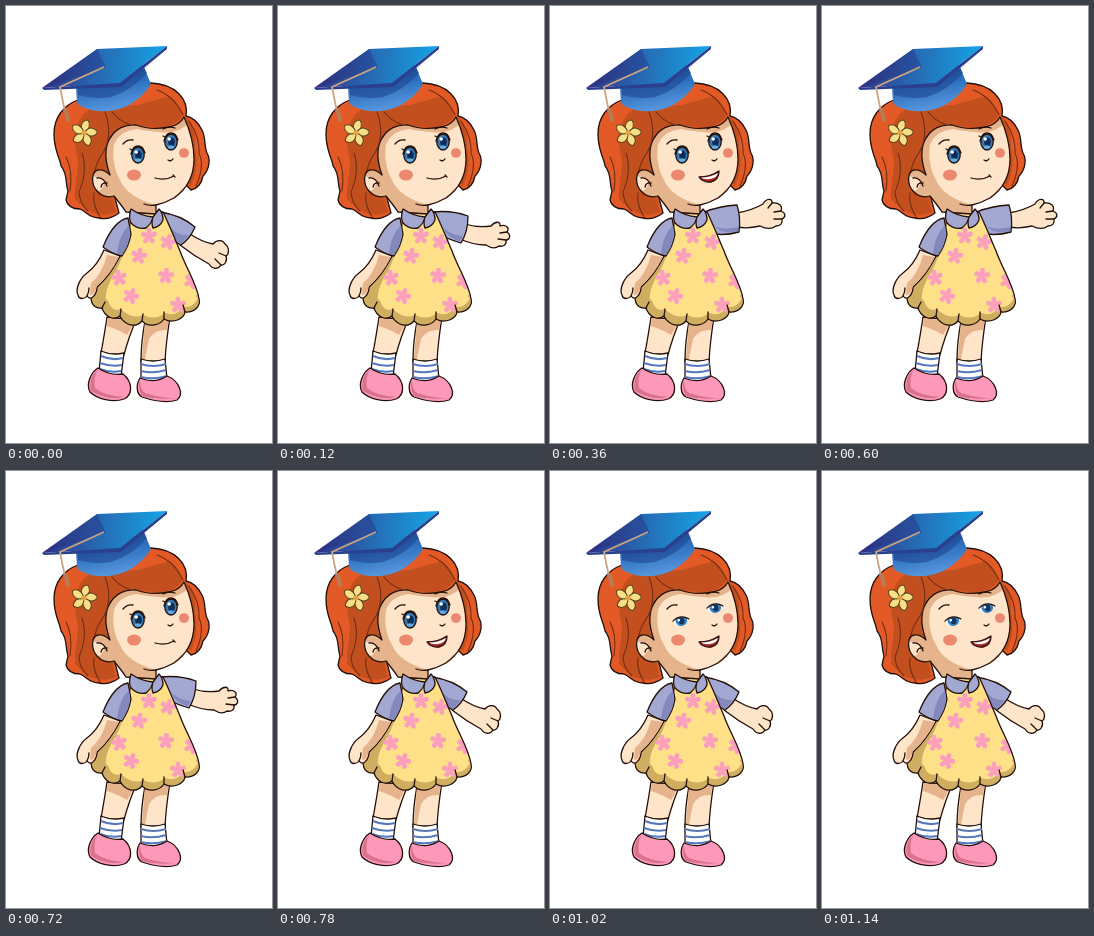
Write an HTML page that moves like this. It is 266x437 px and loops after 1200 ms.

```html
<!DOCTYPE html>
<html lang="en">
<head>
<meta charset="utf-8">
<title>Waving girl</title>
<style>
html, body { margin: 0; width: 100%; height: 100%; overflow: hidden; background: #fff; }
svg { display: block; width: 266px; height: 437px; }
.ink { stroke: #24100a; stroke-width: 1.3; stroke-linejoin: round; stroke-linecap: round; }
.line { fill: none; }
.skin { fill: #fee4c8; }
.shade { fill: #e5b48c; }
.sleeve { fill: #a3a8d3; }
.fold { fill: #8289bb; }
.strand { fill: none; stroke: #722d12; stroke-width: 1.1; stroke-linecap: round; }
.pose { opacity: 0; }
</style>
</head>
<body>
<svg viewBox="0 0 266 437">
  <defs>
    <linearGradient id="board" x2="1"><stop stop-color="#303184"/><stop offset=".4" stop-color="#2864ae"/><stop offset="1" stop-color="#14a5e6"/></linearGradient>
    <linearGradient id="cap" x2=".3" y2="1"><stop stop-color="#244f9d"/><stop offset=".55" stop-color="#2d70bd"/><stop offset="1" stop-color="#5595dc"/></linearGradient>
    <path id="gown" d="M125 207 C124 228 118 247 106 262 C97 275 88 283 85 291 C85 300 91 303 96 302 C99 311 108 315 114 310 C119 320 130 322 136 315 C143 322 154 319 158 313 C167 318 178 313 179 306 C188 307 195 300 193 293 C191 278 180 262 174 245 C168 231 163 218 157 206Z"/>
    <clipPath id="inGown"><use href="#gown"/></clipPath>
    <path id="headSkin" d="M108 190 C102 192 95 190 91 185 C84 177 86 165 92 164 C97 163 101 166 104 169 C100 158 98 144 103 134 C109 122 120 118 130 119 C143 124 153 123 163 121 Q174 119 178 111 C183 122 188 139 188 153 C188 170 181 183 168 192 Q159 197 150 199 L150 208 L120 206 Q116 200 108 190Z"/>
    <clipPath id="inHead"><use href="#headSkin"/></clipPath>
    <g id="bloom"></g>
  </defs>

  <!-- legs -->
  <g class="ink">
    <path class="skin" d="M101 311 Q98 331 95 347 L118 349 Q122 333 130 314Z"/>
    <path class="skin" d="M139 315 Q135 336 135 356 L159 356 Q160 336 164 311Z"/>
  </g>
  <path class="shade" d="M102 312 L128 315 Q124 325 121 329 Q113 324 101 320ZM139 316 L163 313 L161 324 Q149 323 143 333 L139 353 L136 353Z"/>
  <g class="ink" fill="#fff">
    <path d="M95 345 Q106 350 118 347 L115 371 Q103 371 93 366Z"/>
    <path d="M135 353 Q147 357 159 353 L161 373 Q147 379 135 374Z"/>
  </g>
  <g fill="none" stroke="#5479bd" stroke-width="2">
    <path d="M95 350 Q106 355 117 352M94 357 Q105 361 116 359M94 363 Q104 367 115 365"/>
    <path d="M135 358 Q147 362 160 358M135 365 Q147 368 160 364M135 371 Q147 374 161 370"/>
  </g>
  <g class="ink" fill="#fe98ba">
    <path d="M92 362 C84 367 80 379 84 386 C91 393 107 397 118 393 C127 389 127 376 117 368 Q104 370 92 362Z"/>
    <path d="M134 372 C130 378 130 388 136 391 C148 395 162 397 171 394 C178 389 174 375 161 370 Q149 378 134 372Z"/>
  </g>
  <path fill="#d9728f" d="M91 364 Q87 375 89 382 Q99 390 118 391 Q102 395 85 385 Q82 373 91 364ZM134 374 Q134 384 139 387 Q153 392 170 392 Q151 394 136 390 Q131 382 134 374Z"/>

  <!-- right arm -->
  <g id="armDown" class="ink pose">
    <path class="skin" d="M184 228 Q196 236 207 238 C211 233 217 234 219 238 C224 242 223 248 220 250 C222 255 218 260 215 259 C212 264 206 263 203 258 Q188 250 174 239Z"/>
    <path class="line" d="M220 250 L213 247M215 259 L209 253"/>
    <path class="sleeve" d="M154 206 Q175 209 189 221 Q184 233 175 239 Q165 234 157 225Z"/>
    <path class="fold" stroke="none" d="M165 222 Q172 230 183 229 L175 238 Q167 234 165 222Z"/>
  </g>
  <g id="armMid" class="ink pose">
    <path class="skin" d="M187 218 Q200 222 213 220 C217 215 223 215 222 220 C228 218 232 222 229 226 C234 230 231 234 228 234 C229 239 225 241 221 240 C216 244 211 241 208 239 Q195 239 182 233Z"/>
    <path class="line" d="M229 226 L222 227M228 234 L220 233"/>
    <path class="sleeve" d="M154 206 Q174 204 190 210 Q190 226 183 237 Q169 233 157 226Z"/>
    <path class="fold" stroke="none" d="M166 222 Q173 229 185 230 L182 235 Q169 232 166 222Z"/>
  </g>
  <g id="armUp" class="pose">
    <g id="raised" class="ink">
      <path class="skin" d="M187 207 Q203 204 213 198 C216 192 223 192 222 197 C229 196 233 200 231 205 C236 207 236 211 232 213 C233 218 230 220 226 220 C221 224 214 222 210 220 Q198 223 186 221Z"/>
      <path class="line" d="M222 197 L218 202M231 205 L224 206M232 213 L224 213"/>
      <path class="sleeve" d="M154 206 Q170 200 187 199 Q191 212 189 226 Q171 231 157 226Z"/>
      <path class="fold" stroke="none" d="M165 220 Q174 225 188 221 L188 225 Q171 229 165 220Z"/>
    </g>
  </g>
  <g id="armHigh" class="pose"><use href="#raised" transform="rotate(7 160 215)"/></g>

  <!-- dress -->
  <use href="#gown" fill="#fde087"/>
  <g clip-path="url(#inGown)">
    <path fill="#cfae62" d="M124 212 Q124 236 110 265 Q98 284 100 293 Q106 300 115 299 Q127 309 138 303 Q149 311 160 303 Q170 306 178 296 Q187 299 191 288 L197 325 L80 325 L84 286Z"/>
    <path fill="#fde087" d="M101 290 Q104 307 115 303 Q126 314 137 309 Q149 315 159 307 Q170 311 178 301 Q187 302 192 292 L160 265 L116 270Z"/>
    <g id="print" fill="#fa9fbd"></g>
  </g>
  <use href="#gown" class="ink line"/>
  <path class="ink line" stroke-width="1" d="M96 302 L99 296M114 310 L115 303M136 315 L137 308M158 313 L158 306M179 306 L177 299"/>

  <!-- left arm -->
  <g class="ink">
    <path class="skin" d="M98 244 Q91 260 81 267 C74 272 69 283 72 289 C73 294 79 293 81 290 C85 296 91 288 91 281 Q104 270 114 250Z"/>
    <path class="shade" stroke="none" d="M113 251 L101 249 Q96 268 85 277 L84 289 Q89 289 91 280 Q104 269 113 251Z"/>
    <path class="line" d="M81 290 Q83 286 83 282"/>
    <path class="sleeve" d="M122 212 C112 214 103 226 97 241 Q106 248 116 250 Q123 240 125 228Z"/>
    <path class="fold" stroke="none" d="M123 219 Q113 229 111 247 L116 249 Q123 239 124 228Z"/>
  </g>

  <!-- head -->
  <path class="ink" fill="#e45a26" d="M72 94 C58 99 48 111 48 128 C48 145 54 152 55 160 C62 168 59 177 62 185 L60 194 C62 202 69 203 74 203 C81 206 83 212 93 212 C101 214 109 210 113 207 L108 188 L177 176 L185 184 C194 182 196 175 197 170 C203 164 205 154 201 147 C198 140 200 132 196 124 Q190 112 180 110 C183 93 169 78 145 77Z"/>
  <path fill="#c24f1e" d="M84 103 C72 110 67 127 70 145 C75 160 68 175 69 193 Q78 203 87 207 Q100 211 110 206 L104 180 L107 135 L128 120 L156 121 Q172 119 176 110 Q174 97 164 90 Q150 94 132 99ZM180 111 Q191 123 189 142 Q194 160 185 180 L178 174Z"/>
  <use href="#headSkin" class="skin"/>
  <path class="shade" clip-path="url(#inHead)" d="M80 155 L100 115 L185 105 L184 116 Q171 129 154 126 Q139 125 131 123 Q113 125 108 139 Q105 158 114 174 Q121 191 150 199 Q167 195 178 181 L170 196 L150 203 L148 212 L110 212 L86 187 Q100 185 98 173 L89 171Z"/>
  <use href="#headSkin" class="ink line"/>
  <path class="line ink" d="M91 172 Q98 171 101 180M95 181 Q96 176 101 177M150 199 Q143 200 138 198"/>
  <path class="strand" d="M60 151 Q67 164 64 185M76 147 Q82 165 73 186 Q74 198 82 205M88 187 Q86 198 94 211M99 106 Q107 127 98 145 Q91 155 89 164M106 106 Q113 115 123 118M151 84 Q168 90 177 109M183 115 Q194 131 193 147 Q199 160 190 180"/>
  <g id="clip" transform="translate(78 127)" fill="#f7df8a" stroke="#5e431d" stroke-width="1"></g>

  <!-- cap -->
  <path d="M70 79 L71 97 C80 106 102 108 119 101 Q136 93 145 78 L137 59Z" fill="url(#cap)"/>
  <path d="M72 82 L112 79 L138 61 L141 67 Q125 85 105 91 Q87 94 72 89Z" fill="#1e438c" opacity=".55"/>
  <path d="M36 82 L91 43 L161 40 L114 77Z" fill="url(#board)"/>
  <path d="M36 82 L114 77 L161 40 L161 43 L115 81 L38 84Z" fill="#29408f"/>
  <path d="M91 43 L36 82 L100 62Z" fill="#292b78" opacity=".4"/>
  <path d="M98 61 L54 81 Q56 92 59 105" fill="none" stroke="#d0a382" stroke-width="1.8"/>
  <path d="M57 103 L61 102 L64 114 L61 117Z" fill="#b77d56"/>

  <!-- collar -->
  <g class="ink sleeve">
    <path d="M125 203 Q122 212 125 217 Q132 224 140 222 Q146 217 147 211 Q135 210 125 203Z"/>
    <path d="M147 211 Q145 217 147 222 Q154 221 157 214 Q157 207 153 203Z"/>
  </g>

  <!-- face -->
  <ellipse cx="128" cy="169" rx="7" ry="5.5" fill="#ec886f"/>
  <ellipse cx="178" cy="147" rx="5" ry="4.8" fill="#ec886f"/>
  <path class="line ink" d="M117 138 Q121 133 127 134M157 123 Q162 120 169 122M162 154 Q165 156 167 153"/>
  <g id="eyesOpen" class="pose"></g>
  <g id="eyesHalf" class="pose"></g>
  <g id="eyesShut" class="ink line pose">
    <path d="M123 149 Q131 154 139 148M157 138 Q165 142 173 136M124 151 L121 152M173 136 L175 134"/>
  </g>

  <g id="smile" class="ink line pose"><path d="M149 172 Q159 175 168 170M167 169 L169 171"/></g>
  <g id="talk" class="ink pose">
    <path fill="#a52424" d="M149 171 Q160 171 169 165 Q169 174 161 176 Q153 177 149 171Z"/>
    <path fill="#fff" stroke="none" d="M151 171.5 Q160 171.5 168 167 Q167 172 160 173 Q154 174 151 171.5Z"/>
  </g>
  <g id="wide" class="ink pose">
    <path fill="#8f2420" d="M151 168 Q160 167 166 163 Q169 172 167 179 Q161 183 156 178 Q154 173 151 168Z"/>
    <path fill="#fff" stroke="none" d="M152.5 168.7 Q160 168 165.5 164.5 L166.5 169 Q160 172 154.5 172Z"/>
    <path fill="#de4b3f" stroke="none" d="M157 178 Q161 173 167 175 L166 179 Q161 182 157 178Z"/>
  </g>
</svg>
<script>
const $ = id => document.getElementById(id);
const LOOP = 1200;

const ring = (path, spin = 0) => [0, 1, 2, 3, 4]
  .map(i => `<path d="${path}" transform="rotate(${i * 72 + spin})"/>`).join('');

$('bloom').innerHTML = ring('M-.6 0 C-4 -5 -2 -9 0 -8 C2 -9 4 -5 .6 0Z');
$('clip').innerHTML = ring('M0 0 C-7 -6 -4 -12 1 -13.5 C5 -10 5 -5 0 0Z', 12) +
  '<circle r="2.5" fill="#e3a53b" stroke="none"/>';
$('print').innerHTML = [[143, 230, 0], [162, 236, 15], [133, 250, 10], [113, 272, -10],
  [160, 270, 5], [125, 290, 20], [172, 299, 0], [186, 275, 25]]
  .map(([x, y, r]) => `<use href="#bloom" transform="translate(${x} ${y}) rotate(${r})"/>`).join('');

const openEye = (x, y) => `<g transform="translate(${x} ${y})">
  <ellipse class="ink" rx="6.2" ry="8" fill="#3479b8"/>
  <ellipse cx=".5" rx="3.3" ry="4.6" fill="#102c53"/>
  <ellipse cy="5" rx="3.2" ry="1.8" fill="#65ace0"/>
  <circle cx="-1.8" cy="-3" r="1.8" fill="#fff"/>
  <path class="ink line" d="M-7 -1 Q-5 -9 0 -9 Q5 -9 7 -2M-6 -5 L-8 -6"/></g>`;

const halfEye = (x, y) => `<g transform="translate(${x} ${y}) rotate(-8)">
  <path d="M-8 -1 Q0 -6 8 -1 Q4 5 -2 5 Q-7 4 -8 -1Z" fill="#fff"/>
  <path d="M-5.5 -3 Q0 -5 6 -3 Q7 5 0 5 Q-6 5 -5.5 -3Z" fill="#3681c8"/>
  <ellipse cx=".5" rx="3" ry="3.4" fill="#123562"/>
  <circle cx="-2" cy="-1" r="1.3" fill="#fff"/>
  <path class="ink line" d="M-8 -1 Q0 -7 8 -1"/></g>`;

$('eyesOpen').innerHTML = openEye(132, 149) + openEye(165, 136);
$('eyesHalf').innerHTML = halfEye(131, 150) + halfEye(165, 137);

// Each track lists [start time, visible part].
const tracks = [
  [[0, 'armDown'], [60, 'armMid'], [180, 'armHigh'], [240, 'armUp'],
   [660, 'armHigh'], [720, 'armMid'], [780, 'armDown']],
  [[0, 'smile'], [60, 'talk'], [120, 'smile'], [180, 'wide'], [240, 'smile'], [360, 'talk'],
   [600, 'smile'], [660, 'talk'], [720, 'smile'], [780, 'talk'], [840, 'wide'],
   [960, 'smile'], [1020, 'talk']],
  [[0, 'eyesOpen'], [1020, 'eyesHalf'], [1080, 'eyesShut'], [1140, 'eyesHalf']]
];

for (const track of tracks) {
  for (const part of new Set(track.map(step => step[1]))) {
    const frames = track.map(([t, name]) =>
      ({ offset: t / LOOP, opacity: +(name === part), easing: 'step-end' }));
    frames.push({ offset: 1, opacity: frames.at(-1).opacity });
    $(part).animate(frames, { duration: LOOP, iterations: Infinity });
  }
}
</script>
</body>
</html>
```
